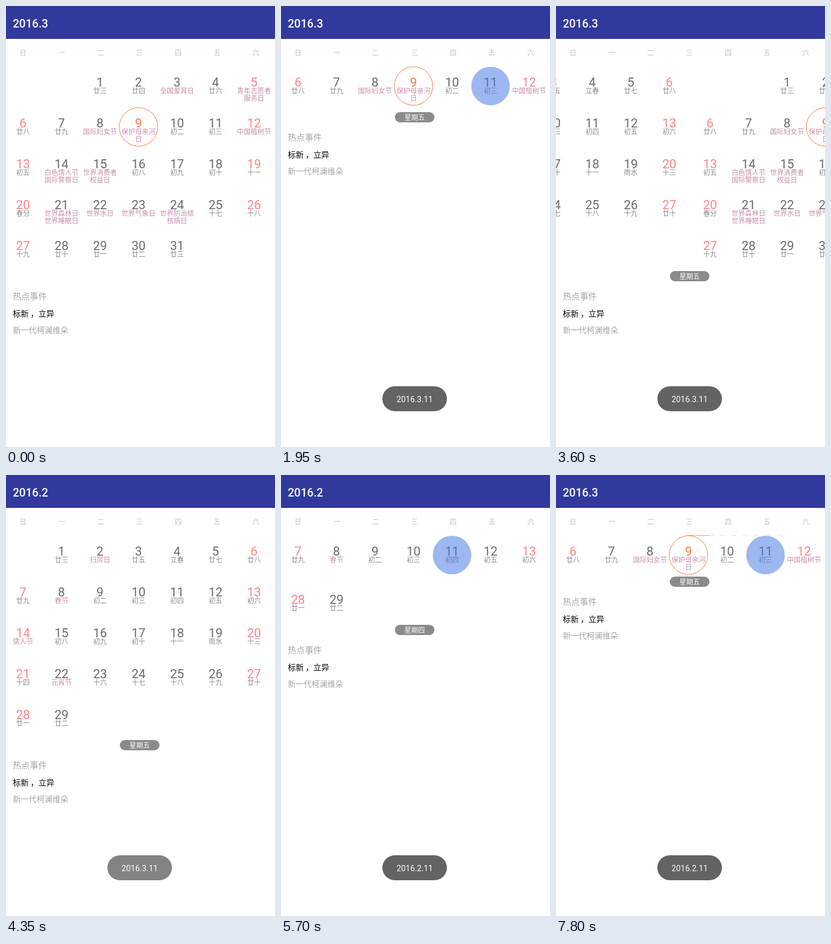
Recreate the animation shown at these times as an HTML page. Size 475 by 777 pixels, loop 8000 ms.

```html
<!DOCTYPE html>
<html lang="zh-CN">
<head>
<meta charset="utf-8">
<title>日历</title>
<style>
  html, body { margin: 0; width: 100%; height: 100%; overflow: hidden; background: #fff; }
  svg { display: block; width: 475px; height: 777px; }
  text { font-family: Roboto, "Noto Sans CJK SC", "Noto Sans CJK", sans-serif; }
  .cjk { font-family: "Noto Sans CJK SC", "Noto Sans CJK", sans-serif; }
  .mid { text-anchor: middle; }
  .head { font-size: 12px; fill: #bfbfbf; }
  .num { font-size: 22px; fill: #6b6b6b; }
  .rest { fill: #ff8488; }
  .now { fill: #fa7840; }
  .sub { font-size: 12px; font-weight: 500; fill: #8a8a8a; }
  .fest { fill: #c88dab; }
</style>
</head>
<body>
<svg id="stage" viewBox="0 0 475 777">
  <defs><clipPath id="pane"><rect y="106" width="475" height="671"/></clipPath></defs>
  <rect width="475" height="777" fill="#fff"/>
  <rect width="475" height="58" fill="#313a9c"/>
  <text id="title" x="12" y="38" font-size="20" font-weight="500" fill="#fff"></text>
  <g id="week"></g>
  <g id="months" clip-path="url(#pane)"></g>
  <g id="panel">
    <g id="pill">
      <rect x="201" y="467" width="70" height="18" rx="9" fill="#8b898b"/>
      <text id="day" class="cjk mid" x="236" y="480.5" font-size="12" font-weight="500" fill="#fff"></text>
    </g>
    <text class="cjk" x="12" y="517" font-size="15" fill="#a6a6a6">热点事件</text>
    <text class="cjk" x="12" y="547" font-size="14" font-weight="500" fill="#000">标新 ，立异</text>
    <text class="cjk" x="12" y="576" font-size="14" fill="#a3a3a3">新一代柯澜维朵</text>
  </g>
  <g id="edge" fill="none" stroke="#fa7840">
    <path d="M231 106.5H270" opacity=".8"/>
    <path d="M270 106.5H412" stroke-dasharray="8 12" opacity=".3"/>
  </g>
  <g id="toast">
    <rect x="179" y="670" width="114" height="44" rx="22" fill="#636363"/>
    <text id="note" class="mid" x="236" y="698" font-size="14.4" fill="#fff"></text>
  </g>
</svg>
<script>
const LOOP = 8000, STEP = 150, PAGE = 480, ROW = 72, TOP = 106;
const $ = id => document.getElementById(id);

function add(parent, tag, attrs, content) {
  const el = document.createElementNS("http://www.w3.org/2000/svg", tag);
  for (const k in attrs) el.setAttribute(k, attrs[k]);
  if (content !== undefined) el.textContent = content;
  return parent.appendChild(el);
}

const move = (el, x, y) => el.setAttribute("transform", `translate(${x} ${y})`);
const show = (el, on) => el.setAttribute("visibility", on ? "visible" : "hidden");
const colX = c => 30 + 68 * c;

function lunarName(n) {
  const prefix = n <= 10 ? "初" : n < 20 ? "十" : "廿";
  return prefix + "一二三四五六七八九十"[(n - 1) % 10];
}

const march = {
  days: 31, first: 2, newMoon: 9, today: 9,
  terms: { 20: "春分" },
  fests: {
    3: "全国爱耳日", 5: "青年志愿者/服务日", 8: "国际妇女节", 9: "保护母亲河/日",
    12: "中国植树节", 14: "白色情人节/国际警察日", 15: "世界消费者/权益日",
    21: "世界森林日/世界睡眠日", 22: "世界水日", 23: "世界气象日", 24: "世界防治结/核病日"
  }
};
const february = {
  days: 29, first: 1, newMoon: 8,
  terms: { 4: "立春", 19: "雨水" },
  fests: { 2: "扫房日", 8: "春节", 14: "情人节", 22: "元宵节" }
};

function drawDay(row, m, d, col) {
  const x = colX(col);
  const tone = d === m.today ? " now" : col % 6 === 0 ? " rest" : "";
  add(row, "text", { class: "num mid" + tone, x, y: 35.5 }, d);
  const fest = m.fests[d];
  const lunar = d < m.newMoon ? d + 22 : d - m.newMoon + 1;
  const label = fest || m.terms[d] || lunarName(lunar);
  label.split("/").forEach((line, i) =>
    add(row, "text", { class: "cjk sub mid" + (fest ? " fest" : ""), x, y: 48 + 13 * i }, line));
  if (d === m.today)
    add(row, "circle", { cx: x, cy: 35, r: 34, fill: "none", stroke: "#fa7840" });
}

function buildMonth(m) {
  m.page = add($("months"), "g", {});
  m.rows = [0, 1, 2, 3, 4].map(() => add(m.page, "g", {}));
  const pinned = m.rows[1];
  add(pinned, "rect", { width: PAGE, height: ROW, fill: "#fff" });
  for (let d = 1; d <= m.days; d++) {
    const cell = m.first + d - 1;
    drawDay(m.rows[Math.floor(cell / 7)], m, d, cell % 7);
  }
  const pickCol = (m.first + 10) % 7;
  m.pick = add(pinned, "circle", { cx: colX(pickCol), cy: 35, r: 34, fill: "#4679e2", "fill-opacity": .53 });
  m.page.appendChild(pinned); // the week that stays in view covers the others
}

[..."日一二三四五六"].forEach((s, i) =>
  add($("week"), "text", { class: "cjk head mid", x: 30 + 68.5 * i, y: 86.5 }, s));
buildMonth(march);
buildMonth(february);

// Linear track through [time, value] points
function track(t, pts) {
  if (t <= pts[0][0]) return pts[0][1];
  for (let i = 1; i < pts.length; i++) {
    const [t0, a] = pts[i - 1], [t1, b] = pts[i];
    if (t <= t1) return a + (b - a) * (t - t0) / (t1 - t0);
  }
  return pts[pts.length - 1][1];
}

const LIFT = [[1500, 0], [1650, 70], [1800, 200], [1950, 280], [2100, 288], [2400, 288],
  [2550, 160], [2700, 25], [2850, 4], [3000, 0],
  [5400, 0], [5550, 80], [5700, 203], [5850, 275], [6000, 288]];
const SWIPE = [[3450, 0], [3600, 242], [3750, 425], [3900, 472], [4050, PAGE], [6450, PAGE],
  [6600, 400], [6750, 240], [6900, 60], [7050, 8], [7200, 0]];
const TOAST = [[900, 0], [1500, 1], [4200, 1], [4350, .79], [4500, .4], [4650, 0], [5100, 0], [5700, 1]];

function placeMonth(m, x, lift) {
  show(m.page, Math.abs(x) < PAGE);
  move(m.page, x, 0);
  m.rows.forEach((row, i) =>
    move(row, 0, TOP + ROW * i - (i === 1 ? Math.min(lift, ROW) : lift)));
}

function render(time) {
  const t = Math.floor(time / STEP) * STEP;
  const lift = track(t, LIFT), swipe = track(t, SWIPE);
  placeMonth(march, swipe, lift);
  placeMonth(february, swipe - PAGE, lift);
  march.pick.style.display = (t >= 1050 && t < 4050) || t >= 7800 ? "" : "none";
  february.pick.style.display = t >= 5250 ? "" : "none";
  move($("panel"), 0, -lift);
  show($("pill"), t >= 1050);
  $("day").textContent = t >= 5250 && t < 7800 ? "星期四" : "星期五";
  $("title").textContent = t >= 3750 && t < 6900 ? "2016.2" : "2016.3";
  $("note").textContent = t < 5000 ? "2016.3.11" : "2016.2.11";
  $("toast").setAttribute("opacity", track(t, TOAST));
  show($("edge"), t >= 7800);
}

const start = performance.now();
function tick() {
  render((performance.now() - start) % LOOP);
  requestAnimationFrame(tick);
}
tick();
</script>
</body>
</html>
```
